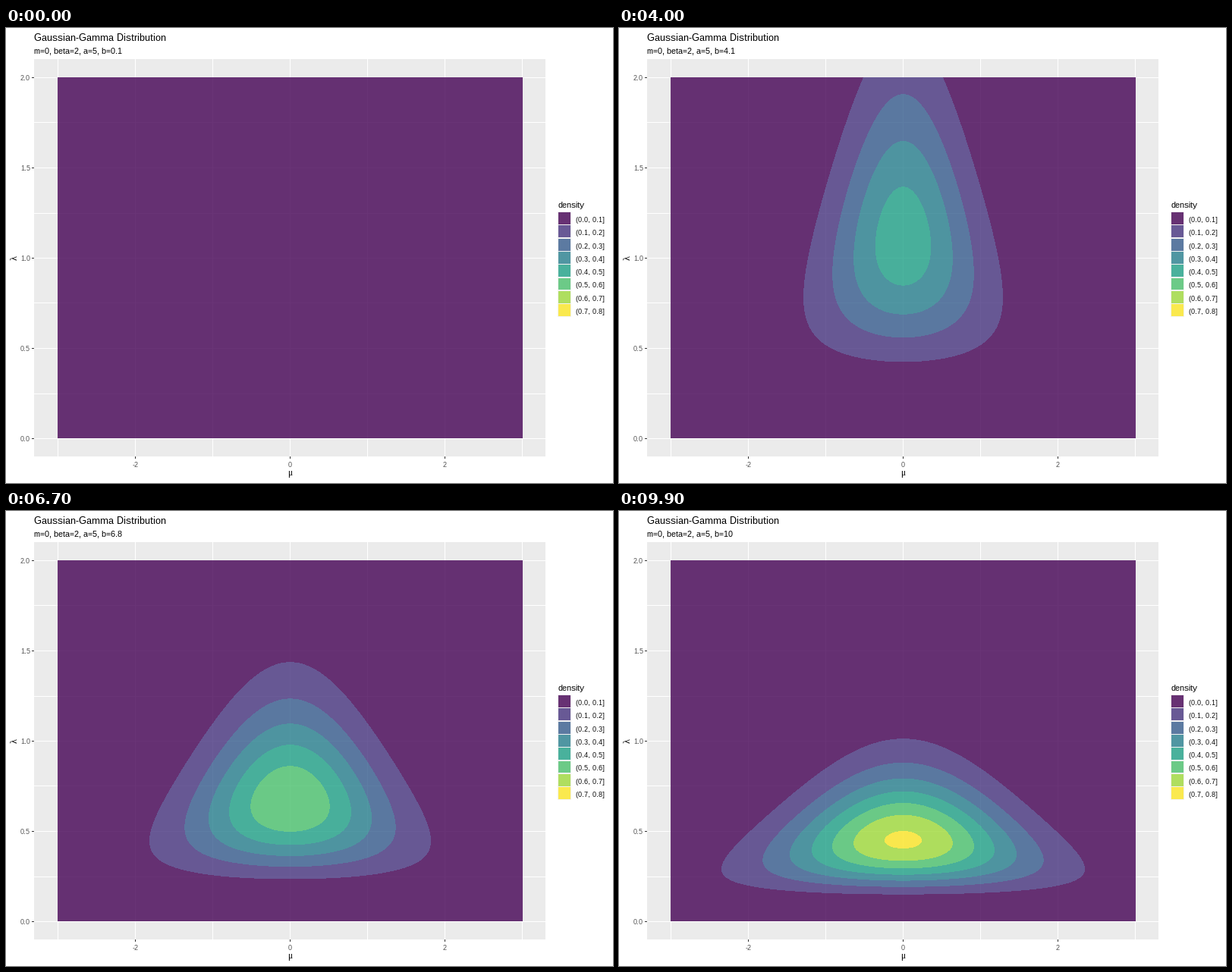
A matplotlib script that plays this animation: 800x600 px, repeating every 10 s.

```python
import numpy as np
import matplotlib.pyplot as plt
from matplotlib.animation import FuncAnimation
from matplotlib.colors import ListedColormap
from matplotlib.patches import Rectangle

plt.rcParams.update({
    "font.family": "Liberation Sans",
    "text.hinting": "default",
    "text.hinting_factor": 1,
})

W, H, DPI = 800, 600, 72
FRAMES, INTERVAL = 100, 100
BETA, A = 2, 5
LEFT, RIGHT, TOP, BOTTOM = 68, 681, 65, 541      # area covered by the density
PX0, PX1, PY0, PY1 = 37, 711, 41, 565            # grey panel
COLORS = ["#440154", "#46337E", "#365C8D", "#277F8E",
          "#1FA187", "#4AC16D", "#9FDA3A", "#FDE725"]
LEVELS = np.arange(1, 8) / 10

fig = plt.figure(figsize=(W / DPI, H / DPI), dpi=DPI, facecolor="white")
ax = fig.add_axes([0, 0, 1, 1])
ax.axis("off")


def box(x0, y0, x1, y1, color, **kw):
    ax.add_patch(Rectangle((x0, y0), x1 - x0, y1 - y0, facecolor=color,
                           linewidth=0, antialiased=False, **kw))


def label(x, y, text, size, color="black", **kw):
    return ax.text(x, y, text, fontsize=size, color=color, va="baseline", **kw)


def mu_px(mu):
    return round(374.2 + 102.1 * mu)


def lam_px(lam):
    return round(541 - 238 * lam)


# Panel, grid and axes
box(PX0, PY0, PX1, PY1, "#EBEBEB", zorder=0)
for mu in range(-3, 4):
    x = mu_px(mu)
    box(x, PY0, x + 1, PY1, "white", zorder=1)
    if mu % 2 == 0:
        box(x, PY1, x + 1, PY1 + 3, "#333333", zorder=1)
        label(x + 0.5, 579, str(mu), 9, "#4D4D4D", ha="center")
for k in range(9):
    y = lam_px(k / 4)
    box(PX0, y, PX1, y + 1, "white", zorder=1)
    if k % 2 == 0:
        box(PX0 - 3, y, PX0, y + 1, "#333333", zorder=1)
        label(19, y + 4, f"{k / 4:.1f}", 9, "#4D4D4D")

label(37, 17, "Gaussian-Gamma Distribution", 13)
subtitle = label(37, 34, "", 11)
label(374.5, 590, "\u03bc", 12, ha="center", family="Liberation Serif")
ax.text(11.5, 303, "\u03bb", fontsize=12, rotation=90, ha="center",
        va="center", family="Liberation Serif")

# Legend
KEY = 17.28
label(728, 237, "density", 11)
box(727, 242, 745, 381, "#F2F2F2", zorder=1)
for i, color in enumerate(COLORS):
    y = 242.4 + KEY * i
    box(728, round(y + 0.7), 744, round(y + KEY - 0.7), color,
        alpha=0.8, zorder=2)
    label(751, round(y + 13.6), f"({i / 10:.1f}, {(i + 1) / 10:.1f}]", 9)

# Density, sampled once per pixel
nx, ny = RIGHT - LEFT, BOTTOM - TOP
mu = ((np.arange(nx) + 0.5) / nx * 6 - 3)[None, :]
lam = (2 - (np.arange(ny) + 0.5) / ny * 2)[:, None]
normal = np.sqrt(BETA * lam / (2 * np.pi)) * np.exp(-BETA * lam * mu**2 / 2)


def bands(b):
    gamma = b**A / 24 * lam**(A - 1) * np.exp(-b * lam)
    return np.digitize(normal * gamma, LEVELS, right=True)


image = ax.imshow(bands(0.1), cmap=ListedColormap(COLORS), vmin=-0.5, vmax=7.5,
                  alpha=0.8, interpolation="nearest", aspect="auto",
                  extent=(LEFT, RIGHT, BOTTOM, TOP), zorder=2)
ax.set_xlim(0, W)
ax.set_ylim(H, 0)


def update(i):
    b = (i + 1) / 10
    image.set_data(bands(b))
    subtitle.set_text(f"m=0, beta={BETA}, a={A}, b={b:g}")
    return image, subtitle


anim = FuncAnimation(fig, update, frames=FRAMES, interval=INTERVAL,
                     repeat=True, repeat_delay=0)
plt.show()
```
